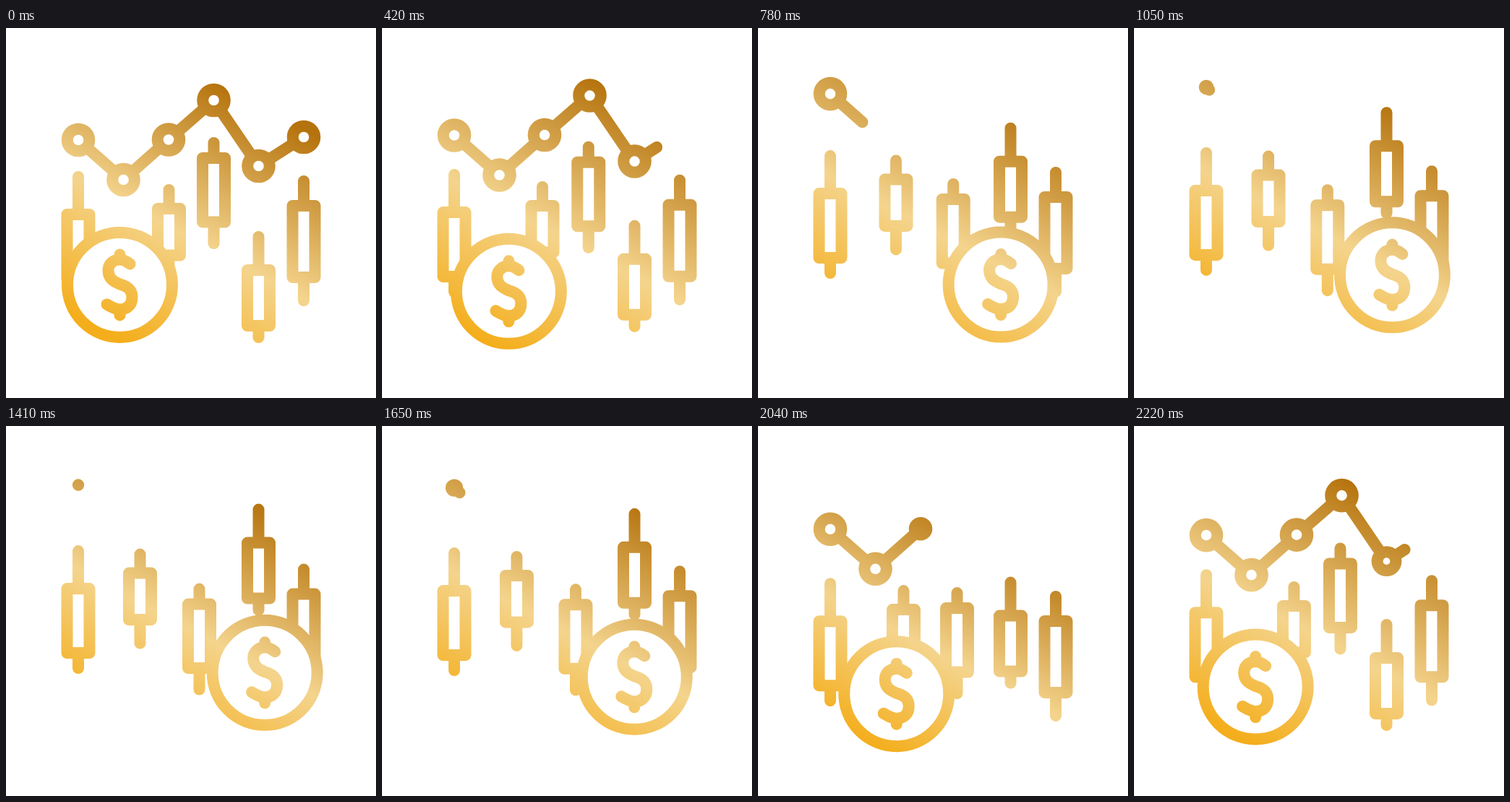
Animation of 512 by 512 pixels, one loop 2250 ms. Source, as an HTML page with a canvas:

```html
<!DOCTYPE html>
<html lang="en">
<head>
<meta charset="utf-8">
<title>Trading chart</title>
<style>
html, body { margin: 0; width: 100%; height: 100%; overflow: hidden; background: #fff; }
canvas { display: block; width: 512px; height: 512px; }
</style>
</head>
<body>
<canvas id="stage" width="512" height="512"></canvas>
<script>
const ctx = document.getElementById('stage').getContext('2d');
const LOOP = 2250, STEP = 30, TURN = 1230;
const LIFT = 74, HALF = 8, RING = 15.3, COIN = 72.5;

// cx, top, body height, upper wick, lower reach, x shift, y shift
const candles = [
  [100, 250, 105, 52, 126, 0, 40.5],
  [225.5, 242, 80.5, 26, 113, -40, 27],
  [287.5, 172, 104.5, 21, 134, -20, 140],
  [349.5, 327, 93, 46, 109, 0, -100],
  [412, 238, 115, 34, 147, 0, 60]
];
// x, y, share of the line drawn when the ring starts to open
const nodes = [
  [100, 155, 0], [162.5, 210, .17], [225, 154.5, .352],
  [287.5, 100, .54], [349.5, 191, .826], [412, 151, .915]
];
const lineLength = nodes.slice(1).reduce(
  (sum, n, i) => sum + Math.hypot(n[0] - nodes[i][0], n[1] - nodes[i][1]), 0);
const dollar = new Path2D('M14-29C9-33 5-35 0-35C-10-35-16-28-16-20C-16-9-9-5 0-1' +
  'C11 2 17 7 17 17C17 28 10 34 0 34C-7 34-13 30-18 27M0-42V-35M0 34V42');

const clamp = v => Math.min(1, Math.max(0, v));

// Bezier easing with flat ends: control points (a, 0) and (b, 1)
function ease(x, a, b) {
  x = clamp(x);
  let lo = 0, hi = 1;
  for (let i = 0; i < 30; i++) {
    const u = (lo + hi) / 2, v = 1 - u;
    if (3 * v * v * u * a + 3 * v * u * u * b + u * u * u < x) lo = u; else hi = u;
  }
  return lo * lo * (3 - 2 * lo);
}

function disc(x, y, r, fill) {
  ctx.beginPath();
  ctx.arc(x, y, r, 0, 2 * Math.PI);
  if (fill) { ctx.fillStyle = '#fff'; ctx.fill(); } else ctx.stroke();
}

function gold(top, bottom) {
  const cy = (top + bottom) / 2, h = bottom - top;
  const at = k => [257 + .47 * k * h, cy - .88 * k * h];
  const g = ctx.createLinearGradient(...at(-.56), ...at(.49));
  g.addColorStop(0, '#f4ae1c');
  g.addColorStop(.45, '#f4d48d');
  g.addColorStop(1, '#b5730d');
  return g;
}

function draw(time) {
  const t = Math.floor(time % LOOP / STEP) * STEP;
  let move, shape;
  if (t < TURN) {
    move = shape = ease(t / TURN, .88, .175);
  } else {
    move = 1 - ease((t - TURN) / 1385, .9, .1);
    shape = 1 - ease((t - 1400) / 1175, .92, .25);
  }
  const up = LIFT * move, drawn = 1 - shape;

  const bars = candles.map(([x, top, h, wick, reach, dx, dy]) =>
    ({ x: x + dx * shape, y: top + dy * shape - up, h, wick, reach }));
  const rings = nodes.map(([x, y, start]) =>
    ({ x, y: y - up, r: RING * clamp((drawn - start) / .085) }))
    .filter((n, i) => n.r > 0 || i === 0);
  const coinX = 157.5 + 202 * (move + .2 * move * move * (1 - move));
  const coinY = 380 - .0031 * (coinX - 246.5) ** 2;

  ctx.fillStyle = '#fff';
  ctx.fillRect(0, 0, 512, 512);
  ctx.lineWidth = 2 * HALF;
  ctx.lineCap = ctx.lineJoin = 'round';
  ctx.strokeStyle = gold(
    Math.min(...bars.map(b => b.y - b.wick), ...rings.map(n => n.y - n.r - HALF)),
    Math.max(coinY + COIN + HALF, ...bars.map(b => b.y + b.reach)));

  for (const { x, y, h, wick, reach } of bars) {
    ctx.beginPath();
    ctx.rect(x - 15.5, y + HALF, 31, h - 2 * HALF);
    ctx.moveTo(x, y - wick + HALF);
    ctx.lineTo(x, y + HALF);
    ctx.moveTo(x, y + h - HALF);
    ctx.lineTo(x, y + reach - HALF);
    ctx.stroke();
  }

  ctx.beginPath();
  nodes.forEach(([x, y]) => ctx.lineTo(x, y - up));
  ctx.setLineDash([Math.max(.1, drawn * lineLength), 9999]);
  ctx.stroke();
  ctx.setLineDash([]);
  for (const { x, y, r } of rings) {
    if (r > HALF) disc(x, y, r, true);
    if (r > 0) disc(x, y, r);
  }

  disc(coinX, coinY, COIN, true);
  disc(coinX, coinY, COIN);
  // Shift the pen only while tracing, so the gradient stays fixed to the stage
  const sign = new Path2D();
  sign.addPath(dollar, new DOMMatrix().translate(coinX, coinY));
  ctx.stroke(sign);
}

const begin = performance.now();
function tick() {
  draw(performance.now() - begin);
  requestAnimationFrame(tick);
}
tick();
</script>
</body>
</html>
```
